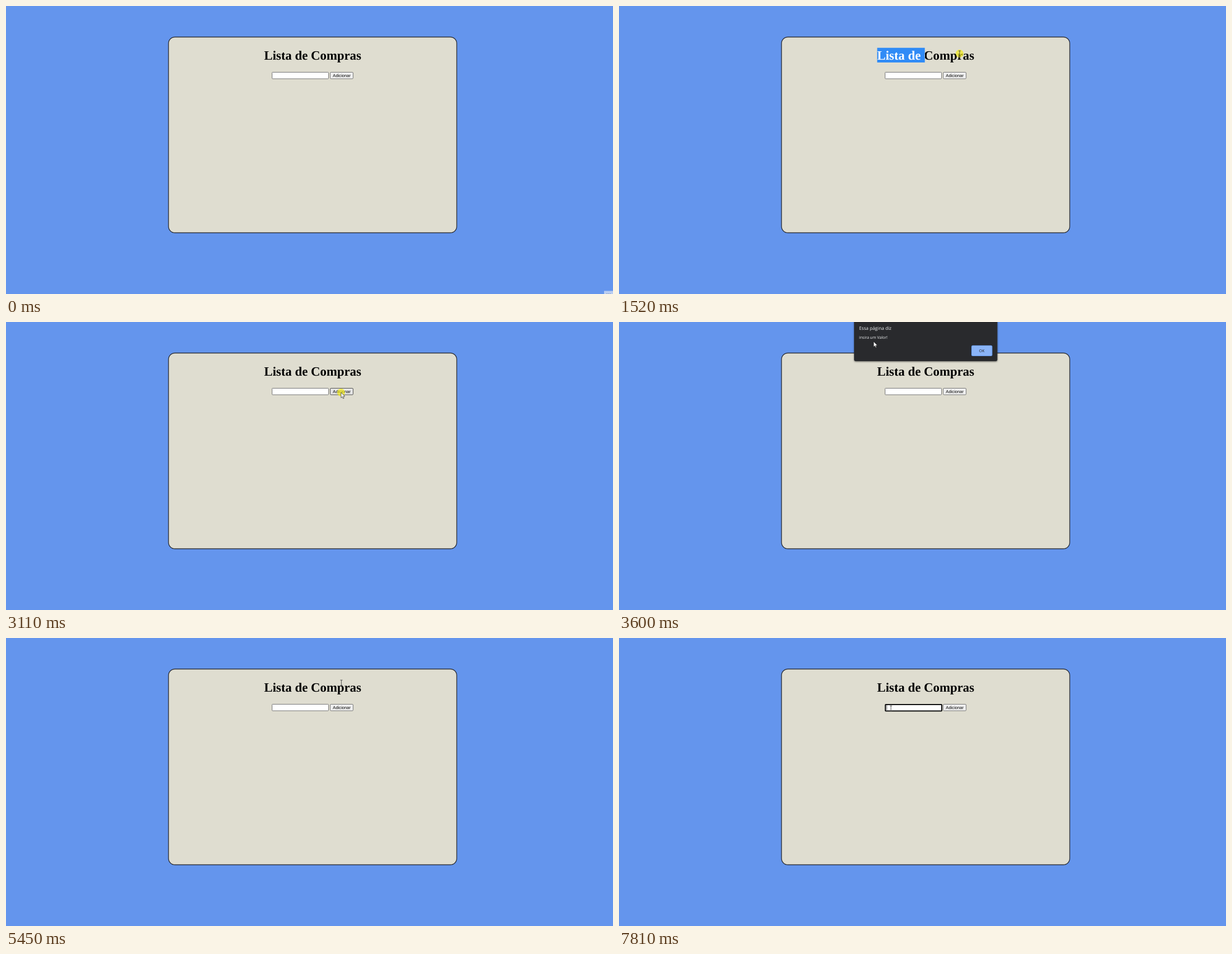
These frames come from a looping animation (1087 px wide and 515 px high, 8 s). An HTML page:

```html
<!DOCTYPE html>
<html lang="pt">
<head>
<meta charset="utf-8">
<style>
  html, body { margin: 0; width: 100%; height: 100%; overflow: hidden; background: #6495ed; }
  svg { display: block; text-rendering: geometricPrecision; }
  .title { font: bold 22.86px "Liberation Serif", serif; }
  .button { font: 7.6px "Liberation Sans", sans-serif; text-anchor: middle; }
  #dialog { font: 7px "Open Sans", sans-serif; fill: #f1f3f4; }
  #panel { filter: drop-shadow(0 1px 1.5px #0008); }
  #input { fill: #fff; stroke: #767676; }
  #input.hover { stroke: #444; }
  #input.focus { stroke: #101010; stroke-width: 2; transform: translate(.5px, .5px); }
  #add { fill: #efefef; stroke: #767676; }
  #add.hover { fill: #e5e5e5; stroke: #4f4f4f; }
</style>
</head>
<body>
<svg width="1087" height="515">
  <rect x="291" y="55.5" width="516.2" height="350" rx="11.5" fill="#dfddd0" stroke="#2e323c" stroke-width="1.4"/>
  <text class="title" x="462.2" y="95.5">Lista de Compras</text>
  <svg id="selection" x="462.2" y="74.5" width="0" height="26.5">
    <rect width="100%" height="100%" fill="#308bf6"/>
    <text class="title" y="21" fill="#fff">Lista de Compras</text>
  </svg>

  <rect id="input" x="476.5" y="118.5" width="101" height="11.6" rx=".8"/>
  <path id="caret" d="M479.5 120v9" stroke="#333" stroke-width=".8"/>
  <rect id="add" x="580.6" y="118.5" width="41" height="11.6" rx="1.5"/>
  <text class="button" x="601.2" y="127.2">Adicionar</text>

  <g id="dialog">
    <path id="panel" d="M421-5V67q0 3 3 3H674.5q3 0 3-3V-5z" fill="#292a2d"/>
    <text x="430" y="14.3" font-size="8.2">Essa página diz</text>
    <text x="430" y="30.3">insira um Valor!</text>
    <rect id="ring" x="631" y="41.7" width="37.6" height="19.4" rx="2.5" fill="#5f95ea"/>
    <rect x="631.9" y="42.6" width="35.8" height="17.6" rx="2" fill="#8ab4f8"/>
    <text x="649.6" y="53.6" text-anchor="middle" fill="#202124">OK</text>
  </g>

  <g id="tooltip">
    <rect x="1071" y="509.5" width="16" height="6" fill="#b9cdf2"/>
    <path d="M1075 514.6h9" stroke="#7d8fb5" stroke-width=".8" stroke-dasharray="2 1"/>
  </g>
  <g id="cursor">
    <circle id="halo" r="7" fill="#f2ea14" opacity=".68"/>
    <path id="arrow" d="M0 0V9.6L2.2 7.5 3.7 11 5.2 10.3 3.8 7H6.8z" fill="#fff" stroke="#222" stroke-width=".7"/>
    <path id="beam" d="M-2-4.7H2M0-4.7V4.7M-2 4.7H2" fill="none" stroke="#444" stroke-width=".9"/>
  </g>
</svg>
<script>
const LOOP = 8000, OPEN = 3180, CLOSE = 5320, FOCUS = 6620;
const el = {};
document.querySelectorAll('[id]').forEach(node => el[node.id] = node);

// Eased pointer moves; the pointer rests between them
const moves = [
  { from: 70, to: 410, x: 672, y: 310 },
  { from: 610, to: 1320, x: 456, y: 88 },
  { from: 1400, to: 1610, x: 707, y: 83 },
  { from: 1950, to: 2150, x: 627, y: 115.5 },
  { from: 2150, to: 2500, x: 500, y: 122 },
  { from: 2500, to: 2840, x: 600, y: 126 },
  { from: OPEN, to: 3600, x: 456, y: 35 },
  { from: 3600, to: 3870, x: 428.5, y: 27 },
  { from: 4210, to: 5120, x: 634, y: 48.6 },
  { from: CLOSE, to: 5670, x: 528, y: 148 },
  { from: 5670, to: 6060, x: 516, y: 126 },
  { from: FOCUS, to: 7000, x: 411, y: 165 },
  { from: 7000, to: 7390, x: 487, y: 126 }
];
const presses = [[1320, 1720], [1830, 1940], [3040, OPEN], [4070, 4210], [5180, CLOSE], [FOCUS, 6760]];

const clamp = (v, a, b) => Math.min(b, Math.max(a, v));
const within = (v, a, b) => v >= a && v < b;
const show = (node, on) => node.style.display = on ? '' : 'none';

function pointerAt(t) {
  let x = 1087, y = 515;
  for (const m of moves) {
    const k = clamp((t - m.from) / (m.to - m.from), 0, 1);
    const ease = k * k * (3 - 2 * k);
    x += (m.x - x) * ease;
    y += (m.y - y) * ease;
  }
  return { x, y };
}

function draw(t) {
  const { x, y } = pointerAt(t);
  const dialogOpen = within(t, OPEN, CLOSE);
  const over = (x0, y0, x1, y1) => !dialogOpen && within(x, x0, x1) && within(y, y0, y1);
  const onInput = over(476, 118, 578, 131);
  const beam = onInput || over(462, 74, 636, 101) || within(t, 1320, 1720);

  // The selection trails the dragging pointer slightly
  const selected = within(t, 1400, 1830) ? clamp(pointerAt(t - 35).x - 462.2, 0, 174) : 0;
  el.selection.setAttribute('width', selected);

  el.input.classList.toggle('hover', onInput);
  el.input.classList.toggle('focus', t >= FOCUS);
  el.add.classList.toggle('hover', over(580, 118, 622, 131));
  show(el.caret, t >= FOCUS && (t + 190) % 1000 < 500);
  show(el.dialog, dialogOpen);
  show(el.ring, t < 4140);
  show(el.tooltip, t < 70);

  show(el.cursor, t >= 70);
  show(el.halo, presses.some(([a, b]) => within(t, a, b)));
  show(el.beam, beam);
  show(el.arrow, !beam);
  el.cursor.setAttribute('transform', `translate(${x} ${y})`);
}

function tick() {
  draw(performance.now() % LOOP);
  requestAnimationFrame(tick);
}
tick();
</script>
</body>
</html>
```
